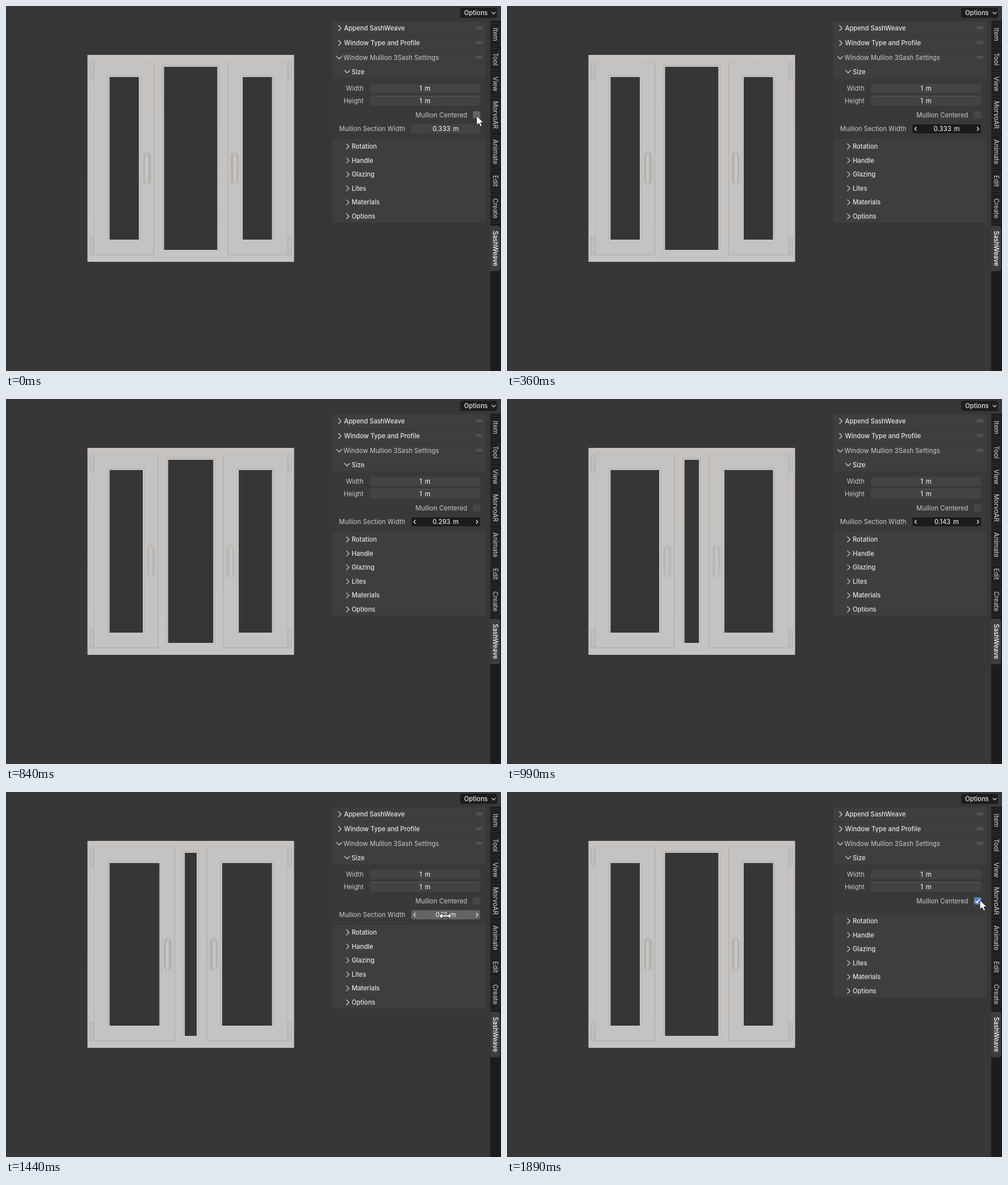
An HTML page for the animation above (1.92 s loop, 872 by 642 pixels).

```html
<!DOCTYPE html>
<html lang="en">
<head>
<meta charset="utf-8">
<title>Window settings</title>
<style>
  html, body { margin: 0; width: 100%; height: 100%; overflow: hidden; background: #373737; }
  svg { display: block; width: 872px; height: 642px; }
  text { font: 500 11.2px Inter, "Noto Sans", sans-serif; fill: #e4e4e4; }
  .label { font-weight: 400; fill: #cbcbcb; letter-spacing: .07px; }
  .value { word-spacing: 1.8px; }
  .line { fill: none; stroke: #d2d2d2; stroke-width: 1.2; stroke-linecap: round; stroke-linejoin: round; }
</style>
</head>
<body>
<svg viewBox="0 0 872 642">
  <defs>
    <linearGradient id="frame" x2="0" y2="1">
      <stop stop-color="#c8c2c1"/><stop offset=".06" stop-color="#c5c2c0"/><stop offset="1" stop-color="#c6c4c2"/>
    </linearGradient>
    <linearGradient id="lever">
      <stop stop-color="#a9a7a5"/><stop offset=".4" stop-color="#cfcdcb"/><stop offset="1" stop-color="#aeacaa"/>
    </linearGradient>
    <filter id="soft" x="-50%" y="-10%" width="200%" height="120%"><feGaussianBlur stdDeviation="1.5"/></filter>
  </defs>
  <rect width="872" height="642" fill="#373737"/>
  <g id="window"></g>
  <g id="chrome"></g>
  <g id="section"></g>
  <g id="subpanels"></g>
  <g id="checkbox"></g>
  <path id="arrow" d="M0 0V16.5L4 13L6.7 19L9.6 17.7L7 12H12.2Z" fill="#fff" stroke="#222" stroke-width="1"/>
  <path id="slider" d="M-11 0L-5.5 -5.5V-1.7H5.5V-5.5L11 0L5.5 5.5V1.7H-5.5V5.5Z" fill="#fff" stroke="#222" stroke-width="1"/>
</svg>
<script>
const LOOP = 1920, STEP = 30, CENTER = 325.5;
const PRESS = 330, RELEASE = 1110, CHECK = 1740;
const REST = 0.333, MIN = 0.13;
const PANEL = '#3e3e3c', FIELD = '#434343';

const $ = id => document.getElementById(id);
const rect = (x, y, w, h, fill, r = 0, extra = '') =>
  `<rect x="${x}" y="${y}" width="${w}" height="${h}" rx="${r}" fill="${fill}" ${extra}/>`;
const field = (x, y, w, fill) => rect(x + .5, y + .5, w - 1, 17, fill, 3.5, 'stroke="#3d3d3d"');
const text = (x, y, s, cls = '', anchor = 'start') =>
  `<text x="${x}" y="${y}" class="${cls}" text-anchor="${anchor}">${s}</text>`;
const line = (d, color, width = 1) => `<path d="${d}" fill="none" stroke="${color}" stroke-width="${width}"/>`;
const closed = (x, y, s = 4.5) => `<path class="line" d="M${x - s / 2} ${y - s}l${s} ${s}l${-s} ${s}"/>`;
const open = (x, y, s = 4.5) => `<path class="line" d="M${x - s} ${y - s / 2}l${s} ${s}l${s} ${-s}"/>`;

// Linear or smoothed interpolation over [time, value] keys.
function track(keys, t, ease = k => k) {
  const i = keys.findIndex(key => key[0] > t);
  if (i < 0) return keys[keys.length - 1][1];
  if (i === 0) return keys[0][1];
  const [t0, a] = keys[i - 1], [t1, b] = keys[i];
  return a + (b - a) * ease((t - t0) / (t1 - t0));
}
const smooth = k => k * k * (3 - 2 * k);
const snap = v => Math.max(MIN, REST + Math.round((v - REST) * 100) / 100);

// The drag runs past the minimum; the value itself is clamped.
const fall = [[840, 0.293], [990, 0.143], [1020, 0.113]];
const valueKeys = [[390, REST], [600, 0.483], [660, 0.523], ...fall];
const paneKeys = [[480, REST], [600, 0.386], [675, 0.513], ...fall];
const cursorX = [[0, 829], [270, 774], [1440, 774], [1650, 832], [1890, 833]];
const cursorY = [[0, 193], [270, 218], [1440, 218], [1650, 191], [1890, 190]];

function grip(y) {
  let dots = '';
  for (let i = 0; i < 8; i++) dots += rect(828 + (i % 4) * 3, y - 3 + (i >> 2) * 3, 1.4, 1.4, '#8c8c8c');
  return dots;
}

function tab(name, top, bottom, active) {
  const mid = (top + bottom) / 2;
  return `<path d="M853 ${top}h13q4 0 4 4V${bottom - 4}q0 4 -4 4h-13Z" fill="${active ? '#3d3d3d' : '#202020'}"
    stroke="${active ? '#3d3d3d' : '#303030'}"/>
    <text transform="translate(857.5 ${mid}) rotate(90)" text-anchor="middle"
    style="fill:${active ? '#fff' : '#bdbdbd'}">${name}</text>`;
}

function drawChrome() {
  let out = rect(800, 3, 65, 18, '#1d1d1d', 4) + text(807, 16, 'Options') + open(859, 12.5, 3);
  out += rect(575, 27, 270, 25, PANEL, 3) + rect(575, 53, 270, 25, PANEL, 3);
  out += rect(575, 79, 270, 48, PANEL, 3) + rect(575, 127, 270, 107, '#393939');
  out += closed(588, 39) + text(595.5, 43, 'Append SashWeave');
  out += closed(588, 65) + text(595.5, 69, 'Window Type and Profile');
  out += open(587, 91) + text(594.5, 95, 'Window Mullion 3Sash Settings', 'label');
  out += open(601, 115.5) + text(609, 119.5, 'Size');
  out += grip(39) + grip(65) + grip(91);
  out += text(630, 149, 'Width', 'label', 'end') + field(640, 136, 196, FIELD);
  out += text(630, 171, 'Height', 'label', 'end') + field(640, 158, 196, FIELD);
  out += line('M643 158.5H833', '#5a5a5a');
  out += text(738, 149, '1 m', 'value', 'middle') + text(738, 171, '1 m', 'value', 'middle');
  out += text(812.5, 195.5, 'Mullion Centered', 'label', 'end');
  out += rect(853, 26, 19, 616, '#1c1c1c');
  out += tab('Item', 30, 70) + tab('Tool', 74, 113) + tab('View', 117, 157) + tab('MorvoAR', 161, 222);
  out += tab('Animate', 227, 286) + tab('Edit', 290, 326) + tab('Create', 330, 382);
  out += tab('SashWeave', 387, 466, true);
  $('chrome').innerHTML = out;

  const names = ['Rotation', 'Handle', 'Glazing', 'Lites', 'Materials', 'Options'];
  $('subpanels').innerHTML = rect(575, 234, 270, 147, PANEL, 3) + names.map((name, i) =>
    closed(602, 247 + i * 24.6) + text(609, 251 + i * 24.6, name)).join('');
}

function opening(x, y, right, bottom, light) {
  const w = right - x, h = bottom - y;
  return rect(x - 3, y - 3, w + 6, h + 6, '#c3c1bf', 0, 'stroke="#b6b3b1"') +
    line(`M${x - 3} ${bottom + 3}H${right + 3}`, '#d0cecc') +
    rect(x, y, w, h, '#363636') +
    line(`M${x - .5} ${bottom + .5}H${right + .5}V${y}`, light);
}

function hinge(y, h) {
  return rect(148.5, y, 5.5, h, '#c4c2c0', 2, 'stroke="#a8a5a3" stroke-width=".9"') +
    line(`M149 ${y + h - 5}h5`, '#aeaba9');
}

function sash(half, moving) {
  const edge = CENTER - half - 17.5, x = CENTER - half - 30.5, glass = CENTER - half - 44.5;
  return rect(155, 98, edge - 155, 340, '#c5c3c1') +
    line(`M155.5 438V98H${edge}`, '#bab7b5') +
    line(`M155 437.5H${edge - .5}V98`, '#aca9a7') +
    opening(182.5, 125, glass, 411, '#d2d0ce') +
    hinge(98, 31) + hinge(405, 33) +
    `<g opacity="${moving ? .65 : 1}">` +
    rect(x - 6, 258, 13, 55, '#b3b0ae', 5, 'filter="url(#soft)"') +
    rect(x - 3, 256, 6, 13, '#c1bfbd', 3, 'stroke="#adaba9" stroke-width=".8"') +
    `<path d="M${x - 4} 264Q${x} 261 ${x + 4} 264Q${x + 7} 288 ${x + 3} 311Q${x} 315 ${x - 3} 311Q${x - 7} 288 ${x - 4} 264Z"
      fill="url(#lever)" stroke="#acaaa8" stroke-width=".8"/></g>`;
}

function drawWindow(value, moving) {
  const half = 47 + (value - REST) * 180;
  const side = sash(half, moving);
  $('window').innerHTML = rect(143.5, 86, 364, 364, 'url(#frame)') +
    opening(CENTER - half, 107, CENTER + half, 429, '#d0cecc') +
    side + `<g transform="translate(${2 * CENTER}) scale(-1 1)">${side}</g>`;
}

function drawSection(value, dragging, hover) {
  const fill = dragging ? '#1b1b1b' : hover ? '#646464' : FIELD;
  let out = text(703.5, 220, 'Mullion Section Width', 'label', 'end') + field(713, 207, 123, fill);
  if (dragging || hover) {
    out += `<path class="line" style="stroke:#eee" d="M721 213l-2.5 3l2.5 3M828.5 213l2.5 3l-2.5 3"/>`;
  }
  out += text(774.5, 220, `${+value.toFixed(3)} m`, 'value', 'middle');
  $('section').innerHTML = out;
}

function drawCheckbox(checked, hover) {
  const fill = checked ? (hover ? '#5580c4' : '#4772b3') : hover ? '#656565' : '#464646';
  $('checkbox').innerHTML = rect(822.5, 185, 13, 13, fill, 3) +
    (checked ? line('M825 191.5l3 3.2l5 -6.5', '#fff', 1.7) : '');
}

function place(id, visible, x, y) {
  $(id).setAttribute('visibility', visible ? 'visible' : 'hidden');
  $(id).setAttribute('transform', `translate(${x} ${y})`);
}

function render(t) {
  const dragging = t >= PRESS && t < RELEASE, checked = t >= CHECK;
  const x = track(cursorX, t, smooth), y = track(cursorY, t, smooth);
  const overField = !checked && x < 836 && y >= 207;
  const overBox = x >= 822 && x <= 836 && y <= 198;
  drawWindow(checked ? REST : Math.max(MIN, track(paneKeys, t)), t > 480 && t < 1080);
  drawSection(snap(track(valueKeys, t)), dragging, overField);
  $('section').setAttribute('visibility', checked ? 'hidden' : 'visible');
  $('subpanels').setAttribute('transform', `translate(0 ${checked ? -20 : 0})`);
  drawCheckbox(checked, overBox);
  place('arrow', !dragging && !overField, x, y);
  place('slider', !dragging && overField, x, y);
}

drawChrome();
const start = performance.now();
function tick() {
  const t = (performance.now() - start) % LOOP;
  render(Math.floor(t / STEP) * STEP);
  requestAnimationFrame(tick);
}
tick();
</script>
</body>
</html>
```
